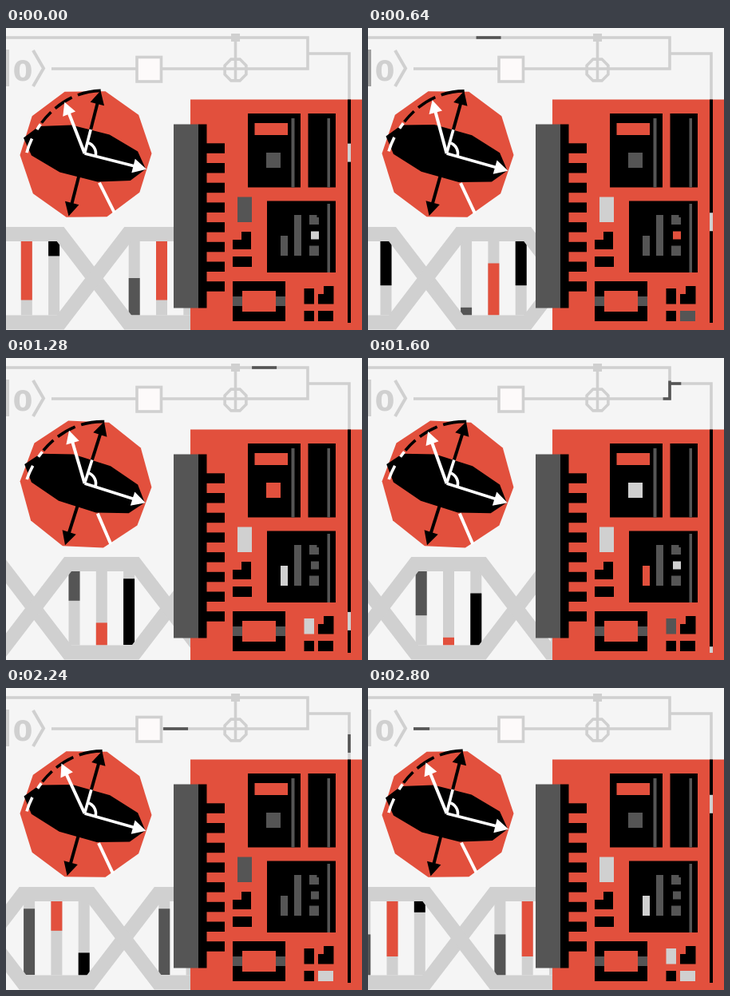
Animation of 446x378 px, one loop 2880 ms. Source, as an HTML page:

```html
<!DOCTYPE html>
<html lang="en">
<head>
<meta charset="utf-8">
<title>Quantum circuit</title>
<style>
  html, body { margin: 0; width: 100%; height: 100%; overflow: hidden; background: #f5f5f5; }
  svg { display: block; width: 446px; height: 378px; }
  .wire { fill: none; stroke: #d0d0d0; stroke-width: 3.6; }
  .pulse { fill: none; stroke: #555; stroke-width: 3.6; }
  .strand { fill: none; stroke: #d0d0d0; stroke-width: 18; stroke-miterlimit: 8; }
  text { font: bold 36px "DejaVu Sans", sans-serif; }
</style>
</head>
<body>
<svg viewBox="0 0 446 378">
  <rect width="446" height="378" fill="#f5f5f5"/>
  <g id="dna"></g>

  <g id="circuit">
    <path class="wire" d="M0 12H378V51H57M378 32H430V90M287.5 12V67"/>
    <path class="pulse" id="signal" d="M0 12H378V51H57"/>
    <path class="pulse" id="feed" d="M378 32H430V90"/>
    <rect x="282" y="7" width="11" height="10" fill="#d0d0d0"/>
    <rect x="164" y="36.500" width="30.500" height="30.500" fill="#fdfafa" stroke="#d0d0d0" stroke-width="3.6"/>
    <path class="wire" id="ring"/>
    <path id="ketBar" d="M2 27V73" stroke-width="4"/>
    <text id="ketZero" x="8.500" y="66">0</text>
    <path id="ketEnd" d="M34 28L47 50.500 34 73" fill="none" stroke-width="4"/>
  </g>

  <g id="sphere">
    <polygon id="ball" fill="#e2503d"/>
    <g id="axes" stroke-width="4" fill="none">
      <path d="M0-70V70" stroke="#000"/>
      <polygon id="disc" fill="#000"/>
      <path d="M0 0V-31M0 0H68M0-14A14 14 0 0 1 14 0" stroke="#fff" stroke-width="3.6"/>
      <path d="M0-81L9-64H-9ZM0 81L9 64H-9Z" fill="#000"/>
      <path d="M80 0L63 9V-9Z" fill="#fff"/>
      <g transform="rotate(-41)"><path d="M0 41V83" stroke="#fff"/></g>
      <g transform="rotate(-16) translate(-98.500 -157)" stroke-width="3.6">
        <path id="arcLow" d="M26 154C34 126 66 79 121 79" stroke="#fff" stroke-dasharray="19 13 8 200"/>
        <path id="arcHigh" d="M26 154C34 126 66 79 121 79" stroke="#000" stroke-dasharray="0 42 18 7 25 8 60"/>
      </g>
      <g id="state"><path d="M0 0V-55" stroke="#fff"/><path d="M0-69L8.500-53H-8.500Z" fill="#fff"/></g>
    </g>
  </g>

  <g id="board">
    <rect x="231" y="89.500" width="215" height="289" fill="#e2503d"/>
    <path d="M430 89.500V369" stroke="#000" stroke-width="4"/>
    <path id="bus" d="M430 90V369" stroke="#d0d0d0" stroke-width="4"/>
  </g>
</svg>
<script>
const STEP = 80, STEPS = 36;
const $ = id => document.getElementById(id);
const colors = { L: '#d0d0d0', D: '#555', R: '#e2503d', K: '#000' };

function add(parent, tag, attrs) {
  const el = document.createElementNS('http://www.w3.org/2000/svg', tag);
  for (const k in attrs) el.setAttribute(k, attrs[k]);
  return parent.appendChild(el);
}
const box = (color, x, y, x2, y2) =>
  add($('board'), 'rect', { x, y, width: x2 - x, height: y2 - y, fill: colors[color] });
const shape = (color, d) => add($('board'), 'path', { d, fill: colors[color] });

function ngon(n, rx, ry, start) {
  return Array.from({ length: n }, (_, i) => {
    const a = (start + i * 360 / n) * Math.PI / 180;
    return (rx * Math.cos(a)).toFixed(2) + ',' + (ry * Math.sin(a)).toFixed(2);
  }).join(' ');
}

// Sphere and gate outlines
$('ball').setAttribute('points', ngon(10, 82.5, 82.5, 0));
$('disc').setAttribute('points', ngon(10, 79, 32, 0));
$('ring').setAttribute('d', 'M' + ngon(8, 14.5, 14.5, 22.5) + 'Z');
$('ring').setAttribute('transform', 'translate(287.5 52.5)');

// Connector
box('D', 210, 120.5, 241.5, 350.5);
box('K', 241, 120.5, 251.5, 350.5);
for (let i = 0; i < 8; i++) box('K', 251, 144.3 + i * 24.7, 274, 156.8 + i * 24.7);

// Chips
box('K', 303, 107, 369, 199.5);
box('R', 311.5, 119, 353, 134);
box('D', 357.5, 113, 361.5, 199.5);
box('K', 378.5, 107, 413, 199.5);
box('D', 402.5, 113, 406, 199.5);
box('K', 327, 216.5, 413, 306);
box('D', 402.5, 220, 406, 306);
box('D', 361, 234, 370, 285);
shape('D', 'M380 234H389.5V237H392V246H380Z');
box('D', 380, 272.5, 392, 285);
shape('K', 'M295 255H307V277H284V265H295Z');
box('K', 284, 286, 308, 299);
box('K', 284, 317, 350, 367);
box('R', 296, 329, 338, 355);
box('D', 284, 336, 296, 348);
box('D', 338, 336, 350, 348);
shape('K', 'M398 323H410.5V345.500H391V333H398Z');
box('K', 373.5, 354, 386, 367);

// Blinking parts: one colour per four steps
const blinkers = [
  ['DDDRRLDDD', 326, 156, 344, 175],
  ['DDDLLRDDL', 344, 260, 353, 285],
  ['LLRDDLLDD', 382, 254.5, 392, 264.5],
  ['DLLLLLDDL', 290, 211.5, 308, 243],
  ['KKKLLDKKL', 373.5, 326, 386, 345.5],
  ['KLDDKKLLL', 391, 354, 410, 367]
].map(([seq, ...r]) => ({ seq, el: box('K', ...r) }));

// Double helix
const PITCH = 169.2, FLOW = 165.6;
const rungs = [];
for (let k = -1; k < 3; k++) {
  const g = add($('dna'), 'g', { transform: `translate(${110.4 + k * PITCH} 0)` });
  ['D', 'R', 'K'].forEach((c, i) => {
    const x = PITCH / 2 + (i - 1) * 34.3, d = `M${x} 267V359.5`;
    add(g, 'path', { d, stroke: '#d0d0d0', 'stroke-width': 14 });
    const el = add(g, 'path', { d, stroke: colors[c], 'stroke-width': 14, 'stroke-dasharray': FLOW / 2 });
    rungs.push({ el, start: 46 - i * FLOW / 3 });
  });
}
const strand = (a, b) => {
  let d = '';
  for (let k = -2; k < 4; k++) {
    const x = 110.4 + k * PITCH, q = PITCH / 4;
    d += `${d ? 'L' : 'M'}${x - q} ${k % 2 ? b : a}L${x + q} ${k % 2 ? a : b}`;
  }
  add($('dna'), 'path', { d, class: 'strand' });
};
strand(258, 368.5);
strand(368.5, 258);

const wrap = (v, n) => ((v % n) + n) % n;
function dash(el, tail, len, period) {
  el.setAttribute('stroke-dasharray', `${len} ${period - len}`);
  el.setAttribute('stroke-dashoffset', -tail);
}
function glow(el, prop, step, peak) {
  const age = step - peak;
  const f = age < 0 ? 0 : Math.max(0, 1 - age / 5);
  const v = Math.round(208 - 123 * f);
  el.setAttribute(prop, `rgb(${v},${v},${v})`);
}

function draw(n) {
  const w = n / STEPS * 2 * Math.PI;

  $('dna').setAttribute('transform', `translate(${-n * PITCH / STEPS} 0)`);
  for (const r of rungs)
    r.el.setAttribute('stroke-dashoffset', -wrap(r.start + n * FLOW / STEPS, FLOW));

  const sway = -1.7 * Math.cos(w);
  $('ball').setAttribute('transform', `translate(100 158) rotate(${sway + 1})`);
  $('axes').setAttribute('transform', `translate(98.5 157) rotate(${16 + sway})`);
  $('state').setAttribute('transform', `rotate(${-35.7 + 5 * Math.sin(w)})`);

  const loop = 776.5, run = 389.9;
  dash($('signal'), wrap(-37 + n * loop / STEPS, loop), 31, loop);
  const tail = wrap(164.6 + n * run / STEPS, run);
  dash($('feed'), tail, 23, run);
  dash($('bus'), tail - 110, 23, run);

  glow($('ketEnd'), 'stroke', n, 1);
  glow($('ketZero'), 'fill', n, 3);
  glow($('ketBar'), 'stroke', n, 5);

  for (const b of blinkers) b.el.setAttribute('fill', colors[b.seq[n >> 2]]);
}

function tick() {
  draw(Math.floor(performance.now() / STEP) % STEPS);
  requestAnimationFrame(tick);
}
$('board').appendChild($('bus'));
tick();
</script>
</body>
</html>
```
